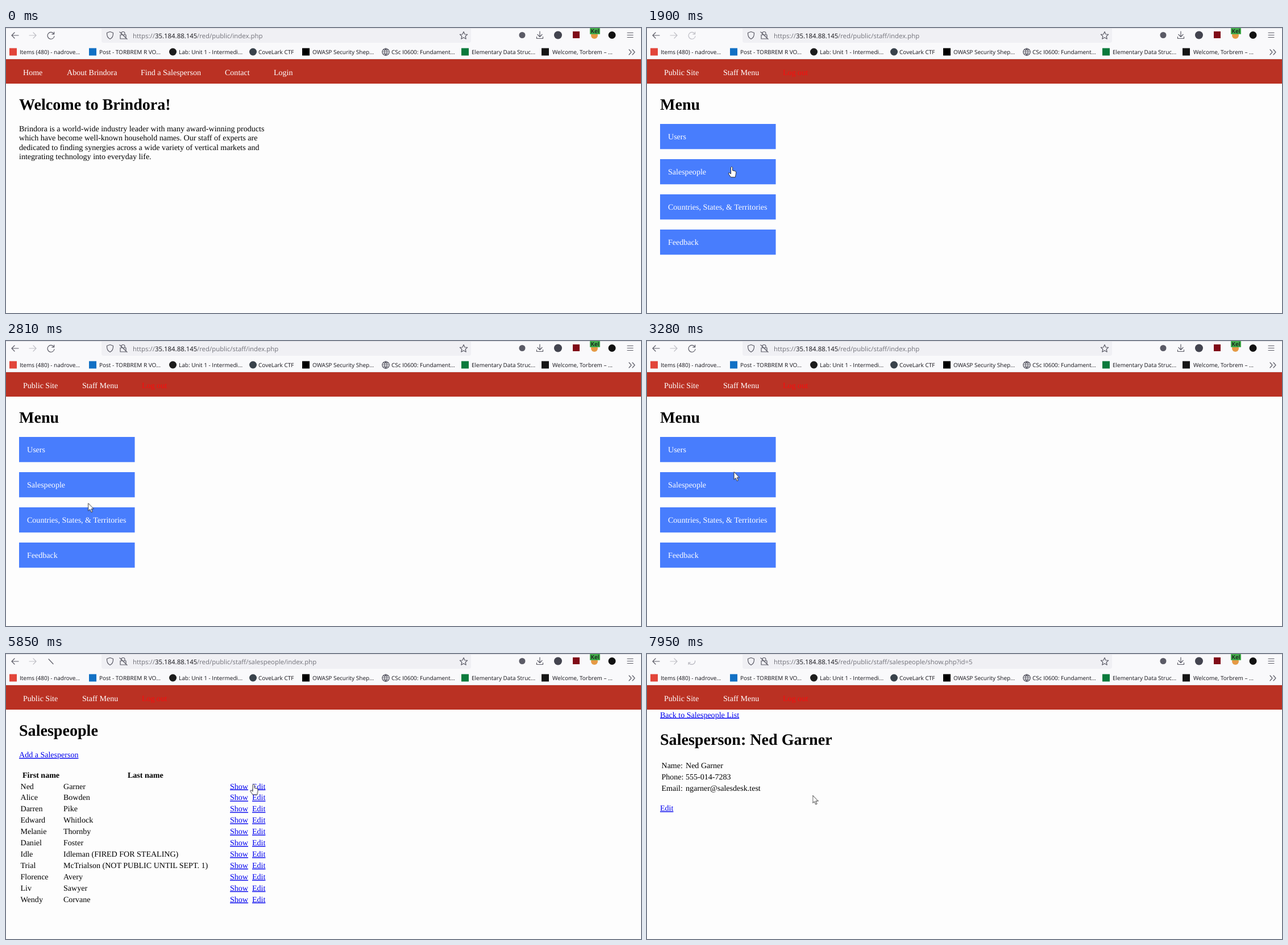
Recreate the animation shown at these times as an HTML page. Size 1117 by 502 pixels, loop 8 s.

```html
<!DOCTYPE html>
<html lang="en">
<head>
<meta charset="utf-8">
<title>Staff site walkthrough</title>
<style>
html, body { margin: 0; width: 100%; height: 100%; overflow: hidden; background: #fdfdfd; }
svg { display: block; width: 1117px; height: 502px; text-rendering: geometricPrecision; }
text { white-space: pre; }
.page text { font: 14.04px "Liberation Serif", "Times New Roman", serif; }
.page .h1 { font-size: 28.08px; font-weight: 700; }
.page .th { font-weight: 700; }
.page .nav { fill: #fff; }
.page .out { fill: #f90d0d; }
.page .link { fill: #00e; text-decoration: underline; }
.page .url { font: 11.4px "Open Sans", "Noto Sans", sans-serif; fill: #72727a; }
.page .field { font: 11.7px "Liberation Sans", Arial, sans-serif; }
.bar text { font: 10px "Open Sans", "Noto Sans", sans-serif; fill: #15141a; }
.bar .address { font-size: 11.4px; }
.icon { fill: none; stroke: #5b5b66; stroke-width: 1.2; stroke-linecap: round; stroke-linejoin: round; }
.page, .state { opacity: 0; }
</style>
</head>
<body>
<svg viewBox="0 0 1117 502" xmlns="http://www.w3.org/2000/svg">
  <rect width="1117" height="502" fill="#fdfdfd"/>
  <g class="bar">
    <rect width="1117" height="55" fill="#f9f9fb"/>
    <path d="M168 0H818V22Q818 26 814 26H172Q168 26 168 22Z" fill="#f0f0f4"/>
    <rect width="1117" height="1" fill="#dcdce2"/>
    <rect y="54" width="1117" height="1" fill="#e3e3e8"/>
    <text class="address" x="223" y="17.5"><tspan fill="#72727a">https://</tspan><tspan x="262">35.184.88.145</tspan></text>
    <g id="bookmarks"></g>

    <g class="icon">
      <path d="M22 13H10M15 8L10 13L15 18"/>
      <path d="M41 13H53M48 8L53 13L48 18" stroke="#bfbfc6"/>
      <path d="M183 6.5L188.5 8.5Q189 16.5 183 19.5Q177 16.5 177.500 8.500Z"/>
      <path d="M203 12V9.500Q203 6.500 206 6.500Q209 6.500 209 9.500V12M201 12H211V19H201ZM200 7L213 19.500"/>
      <path d="M805 6.500L807 11L811.700 11.400L808.100 14.500L809.200 19.200L805 16.700L800.800 19.200L801.900 14.500L798.300 11.400L803 11Z"/>
      <path d="M939 6V15M935 11.500L939 15.500L943 11.500M933.500 15.500V18.500H944.500V15.500"/>
      <path d="M1093 8.500H1103M1093 12.500H1103M1093 16.500H1103"/>
      <path d="M1096 38L1100 42.500L1096 47M1102 38L1106 42.500L1102 47"/>
      <path d="M662 42H674M668 36Q663.500 42 668 48.500M668 36Q672.500 42 668 48.500M663.500 38.700H672.500M663.500 45.500H672.500"/>
      <circle cx="668" cy="42.200" r="6.200"/>
    </g>
    <circle cx="908" cy="12.500" r="5.500" fill="#5b5b66"/>
    <circle cx="971" cy="12.500" r="7" fill="#43444f"/>
    <rect x="997" y="6" width="12" height="12" fill="#800b17"/>
    <circle cx="1035" cy="13" r="6" fill="#e59a45"/>
    <rect x="1027" width="18" height="11" rx="1" fill="#43ad4b"/>
    <text x="1028.500" y="9" style="font-weight:600">Kel</text>
    <circle cx="1066" cy="12.500" r="6.500" fill="#111"/>

    <g class="icon">
      <g id="reload" class="state">
        <path d="M84 10A6 6 0 1 0 85 14.500M84.600 7V10.800H80.800"/>
      </g>
      <path id="slash" class="state" d="M75 9L83 17.500"/>
      <path id="cross" class="state" d="M83 9L75 17.500"/>
      <path id="partial" class="state" d="M84.600 12A6 6 0 0 1 73.500 15.500M73 18.500V15H76.500" stroke="#b5b5bd"/>
    </g>
  </g>
  <rect y="55" width="1117" height="43" fill="#ba3123"/>
  <g id="pages"></g>
  <g id="cursor" stroke="#222" stroke-width=".9" stroke-linejoin="round" fill="#fff">
    <path id="arrow" class="state" d="M0 0V13.500L3 10.800L5.300 16L7.500 15L5.300 10H9.500Z"/>
    <path id="hand" class="state" d="M-1.500 1.500Q0-.8 1.500 1.500V7L6 8Q8 8.500 7.700 11L6.300 18.800H-1.500L-5.500 13Q-6 10.500-4 11L-1.500 13Z"/>
    <path id="beam" class="state" d="M-3.500-7.500Q0-7.500 0-6Q0-7.500 3.500-7.500M0-6V6M-3.500 7.500Q0 7.500 0 6Q0 7.500 3.500 7.500M-2 1H2" fill="none" stroke-width="1.200"/>
  </g>
</svg>
<script>
const LOOP = 8000;
const $ = id => document.getElementById(id);
const text = (x, y, label, cls = '') => `<text x="${x}" y="${y}" class="${cls}">${label}</text>`;
const page = (id, path, body) => `<g id="${id}" class="page">${text(336, 17.5, '/red/public/' + path, 'url')}${body}</g>`;
const staffNav = text(30, 83, 'Public Site', 'nav') + text(134, 83, 'Staff Menu', 'nav') + text(239, 83, 'Log out', 'out');

const bookmarks = [
  [6, 24, '#e2453a', 'Items (480) - nadrove...'],
  [146, 164, '#1170c4', 'Post - TORBREM R VO...'],
  [287, 304, '#1c1c1c', 'Lab: Unit 1 - Intermedi...', 1],
  [428, 444, '#39424b', 'CoveLark CTF', 1],
  [521, 539, '#000', 'OWASP Security Shep...'],
  [0, 678, '', 'CSc I0600: Fundament...'],
  [801, 819, '#0a7a3c', 'Elementary Data Struc...'],
  [942, 961, '#151515', 'Welcome, Torbrem – ...']
];
$('bookmarks').innerHTML = bookmarks.map(([x, tx, color, label, round]) =>
  (color ? `<rect x="${x}" y="35.5" width="13" height="13" rx="${round ? 6.5 : 0}" fill="${color}"/>` : '') +
  text(tx, 46, label)).join('');

const home =
  [[30, 'Home'], [107, 'About Brindora'], [237, 'Find a Salesperson'], [385, 'Contact'], [471, 'Login']]
    .map(([x, label]) => text(x, 83, label, 'nav')).join('') +
  text(23, 144, 'Welcome to Brindora!', 'h1') +
  ['Brindora is a world-wide industry leader with many award-winning products',
   'which have become well-known household names. Our staff of experts are',
   'dedicated to finding synergies across a wide variety of vertical markets and',
   'integrating technology into everyday life.']
    .map((line, i) => text(23, 182 + i * 16.4, line)).join('');

const menu = staffNav + text(23, 144, 'Menu', 'h1') +
  ['Users', 'Salespeople', 'Countries, States, &amp; Territories', 'Feedback'].map((label, i) =>
    `<rect id="button${i}" x="23" y="${169 + i * 62}" width="203.5" height="44.300" fill="#487dfd"/>` +
    text(37, 196 + i * 62, label, 'nav')).join('');

const people = [
  ['Ned', 'Garner'], ['Alice', 'Bowden'], ['Darren', 'Pike'], ['Edward', 'Whitlock'],
  ['Melanie', 'Thornby'], ['Daniel', 'Foster'], ['Idle', 'Idleman (FIRED FOR STEALING)'],
  ['Trial', 'McTrialson (NOT PUBLIC UNTIL SEPT. 1)'], ['Florence', 'Avery'],
  ['Liv', 'Sawyer'], ['Wendy', 'Corvane']
];
const list = staffNav + text(23, 144, 'Salespeople', 'h1') +
  text(23, 182, 'Add a Salesperson', 'link') +
  text(29, 217.5, 'First name', 'th') + text(214, 217.5, 'Last name', 'th') +
  people.map(([first, last], i) => {
    const y = 237.5 + i * 19.92;
    return text(25.5, y, first) + text(101, y, last) + text(394, y, 'Show', 'link') + text(433, y, 'Edit', 'link');
  }).join('');

const [first, last] = people[0];
const phone = '555-014-7283', address = 'ngarner@salesdesk.test';
const back = staffNav + text(23, 111.5, 'Back to Salespeople List', 'link');

const edit = back + text(23, 160, `Edit Salesperson: ${first} ${last}`, 'h1') +
  [['First name:', first], ['Last name:', last], ['Phone:', phone], ['Email:', address]].map(([label, value], i) => {
    const y = 200 + i * 34.3;
    return text(23, y, label) +
      `<rect x="23.5" y="${y + 4}" width="148" height="18" rx="2" fill="#fff" stroke="#8f8f9d"/>` +
      text(27, y + 17, value, 'field');
  }).join('') +
  `<rect id="submit" x="23.5" y="341.5" width="46" height="20" rx="3" fill="#e9e9ed" stroke="#8f8f9d"/>` +
  text(28, 355.5, 'Update', 'field');

const show = back + text(23, 160, `Salesperson: ${first} ${last}`, 'h1') +
  [['Name:', `${first} ${last}`], ['Phone:', phone], ['Email:', address]].map(([label, value], i) =>
    text(25.5, 201 + i * 20, label) + text(68, 201 + i * 20, value)).join('') +
  text(23, 276, 'Edit', 'link');

$('pages').innerHTML =
  page('home', 'index.php', home) +
  page('menu', 'staff/index.php', menu) +
  page('list', 'staff/salespeople/index.php', list) +
  page('edit', 'staff/salespeople/edit.php?id=5', edit) +
  page('show', 'staff/salespeople/show.php?id=5', show);

// Each key is [ms, value, steps until the next key]; changes land 5 ms early.
function play(id, prop, keys) {
  const full = [...keys, [LOOP, keys[keys.length - 1][1]]];
  $(id).animate(full.map(([ms, value, steps = 1]) => ({
    offset: ms / LOOP, [prop]: value, easing: `steps(${steps})`
  })), { duration: LOOP, iterations: Infinity, delay: -5 });
}
// Times alternate between appearing and disappearing.
const reveal = (id, ...times) =>
  play(id, 'opacity', [...(times[0] ? [[0, 0]] : []), ...times.map((ms, i) => [ms, i % 2 ? 0 : 1])]);

reveal('home', 0, 1410);
reveal('menu', 1410, 3890);
reveal('list', 3890, 5920);
reveal('edit', 5920, 7820);
reveal('show', 7820);

reveal('reload', 0, 1060, 1480, 3820, 3960, 5710, 5980, 7340);
reveal('slash', 1060, 1410, 3820, 3890, 5710, 5920, 7340, 7820);
reveal('cross', 1200, 1410, 7480, 7820);
reveal('partial', 1410, 1480, 3890, 3960, 5920, 5980, 7820);
const dark = '#5b5b66', pale = '#bfbfc6';
play('reload', 'stroke', [[0, dark], [1480, pale], [2180, dark], [3960, pale], [4570, dark], [5980, pale], [6250, dark]]);

const blue = '#487dfd', hover = '#3768dc', pressed = '#2b55bd';
play('button1', 'fill', [[0, blue], [2880, hover], [2950, blue], [3350, hover], [3620, pressed]]);
play('button2', 'fill', [[0, blue], [2040, hover], [2110, blue], [2750, hover], [2810, blue]]);
play('button3', 'fill', [[0, blue], [2180, hover], [2250, blue], [2610, hover], [2680, blue]]);
play('submit', 'fill', [[0, '#e9e9ed'], [7080, '#d0d0d7'], [7340, '#b1b1b9']]);

reveal('arrow', 70, 590, 1480, 1900, 1970, 2040, 2110, 2180, 2250, 2610, 2680, 2750, 2810, 2880, 2950, 3350, 3890, 3960, 4640, 5510, 5980);
reveal('hand', 590, 1480, 1900, 1970, 2040, 2110, 2180, 2250, 2610, 2680, 2750, 2810, 2880, 2950, 3350, 3890, 5510, 5980);
reveal('beam', 3960, 4640);

const path = [
  [0, 783, 326], [70, 783, 326, 2], [190, 514, 126], [395, 514, 126, 3], [590, 484, 77], [860, 478, 67],
  [1410, 478, 67, 7], [1900, 149, 244, 5], [2250, 134, 407], [2540, 134, 407, 6], [2950, 150, 225],
  [3280, 153, 230.5], [3350, 146, 243], [3420, 137, 252], [3890, 137, 252, 3], [4100, 113, 254],
  [4500, 113, 254, 10], [5180, 433, 223], [5510, 436, 220], [5710, 435.5, 229],
  [6180, 435.5, 229, 9], [6810, 54, 348], [7080, 54, 347], [7680, 54, 347, 4], [7950, 291.5, 249]
];
play('cursor', 'transform', path.map(([ms, x, y, steps]) => [ms, `translate(${x}px, ${y}px)`, steps]));
</script>
</body>
</html>
```
